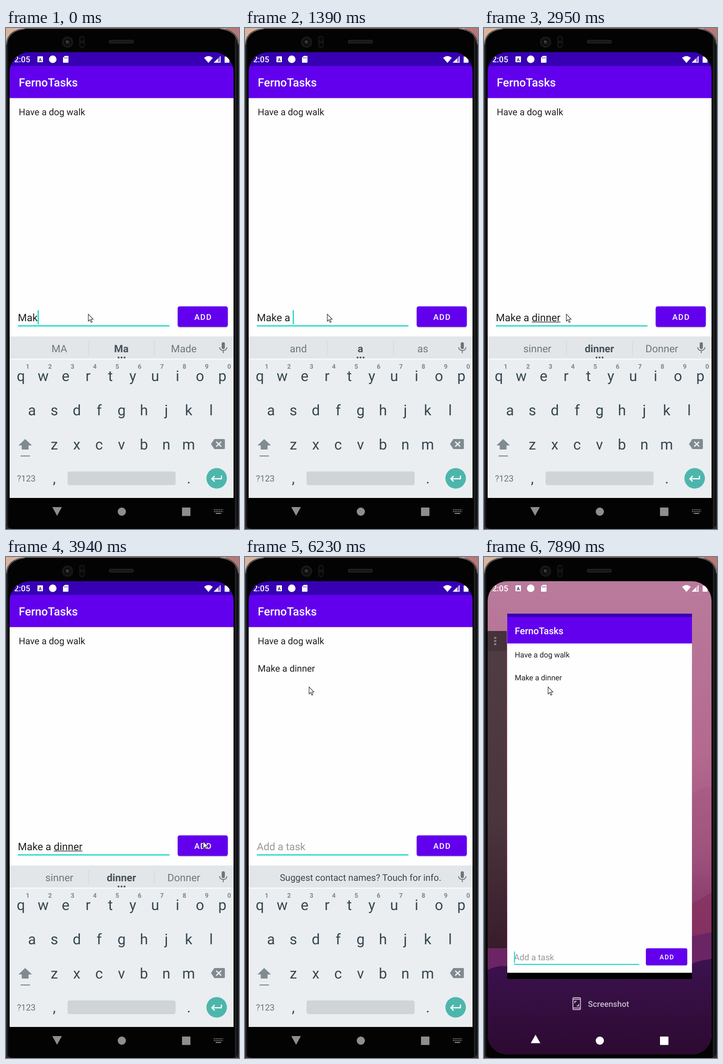
Write an HTML page that moves like this. It is 511x1097 px and loops after 8 s.

```html
<!DOCTYPE html>
<html lang="en">
<head>
<meta charset="utf-8">
<title>To-do app</title>
<style>
html, body { margin: 0; width: 100%; height: 100%; overflow: hidden; background: #000; }
svg { display: block; width: 100%; height: 100%; }
text { font-family: Roboto, sans-serif; white-space: pre; text-rendering: geometricPrecision; }
.mid { text-anchor: middle; }
.medium { font-weight: 500; }
.item { font-size: 20px; fill: #1f1f1f; }
.field { font-size: 22.6px; }
.hint { fill: #999; }
.key { font-size: 32px; fill: #37474f; text-anchor: middle; }
.digit { font-size: 14px; font-weight: 700; fill: #7c878c; text-anchor: middle; }
.word { font-size: 22.5px; fill: #6d787d; text-anchor: middle; }
.best { font-weight: 700; fill: #45535a; }
</style>
</head>
<body>
<svg viewBox="0 0 511 1097">
  <defs>
    <clipPath id="screen"><rect x="8" y="53" width="491" height="1036" rx="43"/></clipPath>
    <clipPath id="button"><rect x="376.500" y="609.500" width="110" height="45" rx="4.500"/></clipPath>
    <linearGradient id="sky" x2="0" y2="1">
      <stop offset="0" stop-color="#b97b9c"/>
      <stop offset=".35" stop-color="#b56a90"/>
      <stop offset=".55" stop-color="#a3567f"/>
      <stop offset=".72" stop-color="#84366a"/>
      <stop offset=".8" stop-color="#7b2f68"/>
    </linearGradient>
    <linearGradient id="ground" x2="0" y2="1">
      <stop offset="0" stop-color="#3c1250"/>
      <stop offset="1" stop-color="#2c0a30"/>
    </linearGradient>
    <linearGradient id="oldCard" x2="0" y2="1">
      <stop offset="0" stop-color="#503d43"/>
      <stop offset=".6" stop-color="#4b353d"/>
      <stop offset="1" stop-color="#381c2a"/>
    </linearGradient>
    <linearGradient id="rim">
      <stop offset="0" stop-color="#3a3c3e"/>
      <stop offset=".006" stop-color="#17181a"/>
      <stop offset=".012" stop-color="#030303"/>
      <stop offset=".98" stop-color="#030303"/>
      <stop offset=".987" stop-color="#2a2b2d"/>
      <stop offset=".991" stop-color="#080808"/>
      <stop offset="1" stop-color="#2a2b2d"/>
    </linearGradient>
  </defs>

  <rect width="511" height="1097" fill="#3a2624"/>
  <rect width="511" height="40" fill="#d9b39b"/>
  <path d="M480 0H511V30Z" fill="#b97874"/>
  <path d="M0 34Q4 4 40 1H471Q507 4 511 34V1085Q508 1096 496 1097H15Q3 1096 0 1085Z" fill="url(#rim)"/>
  <path d="M1 36Q5 5 41 2M470 2Q506 5 510 36" fill="none" stroke="#626365" stroke-width="2"/>
  <g id="hardware">
    <circle cx="135" cy="31" r="12.5" fill="#171717"/>
    <circle cx="135" cy="31" r="8" fill="#0c0d10"/>
    <circle cx="135" cy="31" r="4" fill="#252a32"/>
    <circle cx="133.5" cy="29.5" r="1.5" fill="#59616b"/>
    <rect x="160.500" y="17" width="12.500" height="27" rx="6" fill="#161616"/>
    <circle cx="167" cy="24" r="4.500" fill="#070707"/>
    <circle cx="167" cy="37" r="4.500" fill="#070707"/>
    <rect x="226" y="26" width="54" height="8" rx="3" fill="#252525"/>
    <path d="M229 30H278" stroke="#0b0b0b" stroke-width="5" stroke-dasharray="1.500 1.500"/>
  </g>

  <g clip-path="url(#screen)">
    <g id="recents">
      <rect x="8" y="53" width="491" height="1036" fill="url(#sky)"/>
      <path d="M456 520Q480 500 499 505V700L456 690Z" fill="#9d4f7c" opacity=".25"/>
      <path d="M8 780L120 770L300 790L456 760L499 735V900H8Z" fill="#86315f" opacity=".7"/>
      <path d="M8 858H60L456 830L499 822V930H8Z" fill="#6b2565"/>
      <path d="M8 904Q40 888 70 902L300 906L456 890Q480 882 499 880V1089H8Z" fill="url(#ground)"/>
      <rect x="-40" y="162" width="90" height="695" rx="2" fill="url(#oldCard)"/>
      <rect x="-40" y="162" width="90" height="44" rx="2" fill="#45323a"/>
      <path d="M22 175h5v4h-5zM22 182h5v4h-5zM22 189h5v4h-5z" fill="#8b7c82"/>
      <g fill="none" stroke="#c6bbca" stroke-width="2">
        <rect x="195" y="965" width="16.500" height="26" rx="2"/>
        <path d="M195 968.500H211M195 987.500H211M199 977V973H203M207.500 979V983H203.500"/>
      </g>
      <text x="228" y="985" class="medium" font-size="17.800" fill="#c6bbca">Screenshot</text>
      <rect x="51" y="124" width="405" height="800" rx="1.500" fill="#000"/>
    </g>

    <g id="app">
      <rect id="appStatus" x="8" width="491" fill="#3700b3"/>
      <rect x="8" y="153" width="491" height="874.500" fill="#fefefe"/>
      <rect x="8" y="83" width="491" height="70.500" fill="#6200ee"/>
      <text x="28" y="128.300" class="medium" font-size="25" fill="#fff">FernoTasks</text>
      <text x="28" y="191" class="item">Have a dog walk</text>
      <text x="28" y="251" class="item" id="newItem">Make a dinner</text>
      <g id="entry">
        <text x="26" y="641.800" class="field hint" id="hint">Add a task</text>
        <text x="26" y="641.800" class="field" fill="#1f1f1f" id="typed"></text>
        <rect id="composing" y="643.200" height="1.300" fill="#1f1f1f"/>
        <rect x="26" y="651" width="332.500" height="2.500" fill="#14d5c5"/>
        <rect id="caret" y="618" width="2.500" height="31" fill="#14d5c5"/>
        <rect x="376.500" y="611" width="110" height="45.500" rx="4.500" fill="#000" opacity=".1"/>
        <rect x="376.500" y="610" width="110" height="45.500" rx="4.500" fill="#000" opacity=".15"/>
        <rect x="376.500" y="609.500" width="110" height="45" rx="4.500" fill="#6200ee"/>
        <circle id="ripple" cx="432" cy="625" fill="#fff" clip-path="url(#button)"/>
        <text x="432.500" y="638.500" class="mid medium" font-size="17.500" letter-spacing="1.560" fill="#fff">ADD</text>
      </g>
    </g>

    <g id="keyboard">
      <rect x="8" y="675" width="491" height="354" fill="#eaeef1"/>
      <rect x="8" y="676" width="491" height="48" fill="#e3e6e8"/>
      <rect x="8" y="724" width="491" height="2" fill="#fbfcfc"/>
      <g id="words">
        <path d="M181 686V716M325.500 686V716" stroke="#d0d5d8" stroke-width="1.200"/>
        <text x="117" y="710" class="word"></text>
        <text x="253" y="710" class="word best"></text>
        <text x="390" y="710" class="word"></text>
        <path d="M245 721.500H262" stroke="#45535a" stroke-width="3.600" stroke-dasharray="3.600 3"/>
      </g>
      <text id="notice" x="253.500" y="709" class="mid" font-size="20" fill="#37474f">Suggest contact names? Touch for info.</text>
      <rect x="473" y="688" width="7" height="15" rx="3.500" fill="#6b767b"/>
      <path d="M468.500 699Q469 706 476.500 706T484.500 699M476.500 706V712" fill="none" stroke="#6b767b" stroke-width="2"/>
      <g id="keys"></g>
      <path d="M42 900L57 914H49.500V923H34.500V914H27.500Z" fill="#7f8b90"/>
      <rect x="32" y="936" width="20.500" height="2.200" fill="#7f8b90"/>
      <path d="M457 900H478Q480 900 480 902V920Q480 922 478 922H457L449.500 911Z" fill="#7f8b90"/>
      <path d="M461 906L472 916.500M472 906L461 916.500" stroke="#eef1f3" stroke-width="2.500"/>
      <text x="44.500" y="993" class="mid" font-size="19" fill="#66747a">?123</text>
      <rect x="135" y="971" width="237" height="30" rx="4.500" fill="#cfd4d7"/>
      <circle cx="462" cy="986" r="22.500" fill="#4db6ac"/>
      <path d="M472.500 980V987H452M457.500 981L451.500 987L457.500 993" fill="none" stroke="#fff" stroke-width="2.500"/>
      <rect x="8" y="1029" width="491" height="60" fill="#030303"/>
      <g id="imeDots" stroke="#8e8e8e" stroke-width="2" stroke-dasharray="2.200 1.600">
        <path d="M456 1055H476M456 1059H476"/><path d="M460 1063H472" stroke-dasharray="none"/>
      </g>
    </g>

    <g id="nav">
      <path id="back"/>
      <circle cx="254" cy="1059" r="9"/>
      <rect x="386" y="1050" width="18.500" height="18.500" rx="1"/>
    </g>

    <g id="status" fill="#fff">
      <text x="18" y="75" class="medium" font-size="17.800">2:05</text>
      <rect x="69" y="62" width="12" height="13" rx="1"/>
      <text x="75" y="72.500" class="mid" font-size="10" font-weight="700" fill="#3a2370">A</text>
      <circle cx="102.500" cy="68.500" r="8.300"/>
      <path d="M129 61H136Q137 61 137 62V75Q137 76 136 76H126Q125 76 125 75V65Z"/>
      <path d="M128.500 64V67M131.500 64V67M134.500 64V67" stroke="#4a2f92" stroke-width="1.200"/>
      <path d="M434.500 65.500Q444 57.500 453.500 65.500L444 76.500Z"/>
      <path d="M455.500 76L470.500 61V76Z" opacity=".45"/>
      <path d="M455.500 76L465 66.500V76Z"/>
      <path d="M470 62V75.300H457" fill="none" stroke="#fff" stroke-width="1.400"/>
      <path d="M479.500 62.500H482.500V61H487V62.500H490V76H479.500Z"/>
    </g>
  </g>

  <path id="pointer" d="M.5 .5V16L4 12.700L6.500 18.500L9 17.400L6.500 11.700H11.200Z" fill="#fff" stroke="#222" stroke-width="1.100"/>
</svg>
<script>
const LOOP = 8000, START_X = 26;
const $ = id => document.getElementById(id);
const show = (el, on) => el.setAttribute('display', on ? 'inline' : 'none');
const set = (el, attrs) => { for (const k in attrs) el.setAttribute(k, attrs[k]); };

// Each track is a list of [start ms, value...]; a value holds until the next entry.
const typing = [
  [0, 'Mak', 3], [150, 'Mak', 0], [310, 'Make', 0], [710, 'Make ', 5],
  [990, 'Make a', 5], [1390, 'Make a ', 7], [1640, 'Make a d', 7],
  [1910, 'Make a di', 7], [2060, 'Make a din', 7], [2210, 'Make a dinn', 7],
  [2360, 'Make a dinne', 7], [2510, 'Make a dinner', 7], [4750, '', 0]
];
const guesses = [
  [0, 'MA Ma Made'], [150, 'Make Mak Made'], [490, 'Maker Make Makes'],
  [710, 'sure a it'], [1140, 'and a as'], [1780, 'do d for'],
  [1910, 'do di did'], [2060, 'son din dim'], [2210, 'sinner dinn dinner'],
  [2510, 'sinner dinner Donner'], [4870, '']
];
const caretOn = [
  [0, true], [2950, false], [3540, true], [3940, false], [4500, true],
  [5270, false], [5750, true], [6230, false], [6670, true], [7210, false], [7770, true]
];
const pointerAt = [
  [0, 180, 626], [3230, 405, 650], [3540, 432, 622], [5400, 466, 678],
  [5530, 408, 590], [5680, 290, 420], [5820, 190, 300], [5960, 148, 261],
  [6100, 142, 278], [6230, 140, 284]
];
const rippleAt = [[0, 0, 0], [4500, 18, .25], [4620, 60, .25], [4750, 110, .2], [4870, 110, .1], [5000, 0, 0]];
const at = (track, t) => track.findLast(step => step[0] <= t).slice(1);

function buildKeys() {
  const key = (c, x, y, cls = 'key') => `<text x="${x}" y="${y}" class="${cls}">${c}</text>`;
  const row = (chars, x, y, cls) => [...chars].map((c, i) => key(c, x + i * 49.1, y, cls)).join('');
  $('keys').innerHTML = row('1234567890', 47.5, 746, 'digit') +
    row('qwertyuiop', 32.5, 773) + row('asdfghjkl', 57, 847.5) +
    row('zxcvbnm', 106, 922.5) + key(',', 106, 997) + key('.', 401, 997);
}

const typed = $('typed'), wordEls = [...$('words').querySelectorAll('text')];
function measure(s) {
  typed.textContent = s;
  return s ? typed.getComputedTextLength() : 0;
}

function draw(t) {
  const [text, from] = at(typing, t);
  const left = START_X + measure(text.slice(0, from));
  const end = START_X + measure(text);
  set($('composing'), { x: left, width: end - left });
  set($('caret'), { x: end });
  show($('caret'), at(caretOn, t)[0]);
  show($('hint'), !text);
  show($('newItem'), t >= 4750);

  const words = at(guesses, t)[0].split(' ');
  wordEls.forEach((el, i) => { el.textContent = words[i] || ''; });
  show($('words'), words.length > 1);
  show($('notice'), t >= 5000);

  const [r, opacity] = at(rippleAt, t);
  set($('ripple'), { r, opacity });
  const [x, y] = at(pointerAt, t);
  set($('pointer'), { transform: `translate(${x} ${y})` });

  const recents = t >= 7890;
  show($('recents'), recents);
  show($('keyboard'), !recents);
  set($('app'), { transform: recents ? 'translate(44.4 62.7) scale(.825)' : '' });
  set($('entry'), { transform: recents ? 'translate(0 353)' : '' });
  set($('appStatus'), recents ? { y: 74.3, height: 10 } : { y: 53, height: 30.5 });
  set($('nav'), { fill: recents ? '#fff' : '#8e8e8e' });
  set($('back'), { d: recents ? 'M113 1046L123.500 1064.500H102.500Z' : 'M112 1068L101.500 1049H122.500Z' });
}

function tick(now) {
  draw(now % LOOP);
  requestAnimationFrame(tick);
}
buildKeys();
draw(0);
requestAnimationFrame(tick);
</script>
</body>
</html>
```
